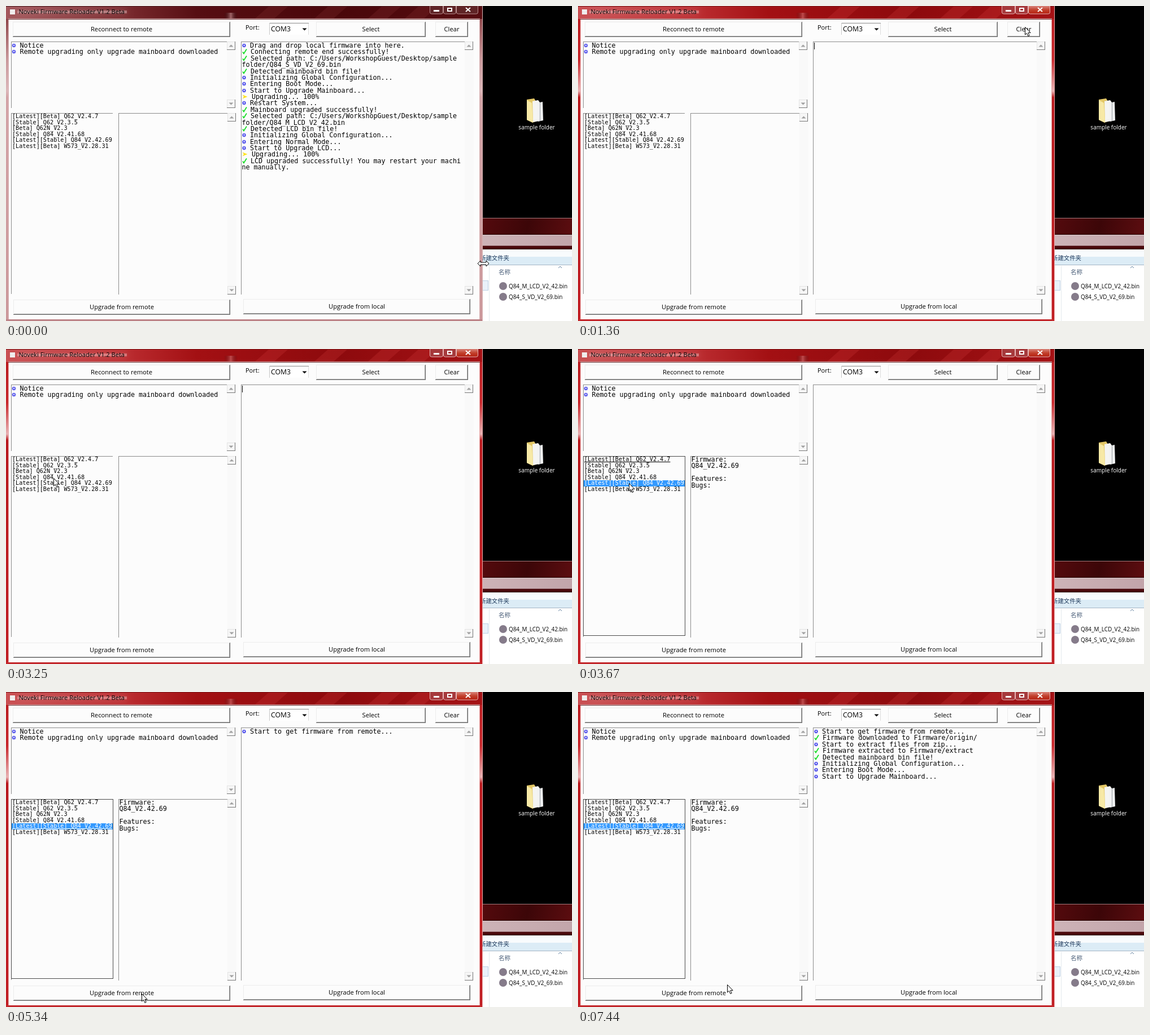
Animation, 1002 px wide and 559 px high, one loop 8000 ms. Source, as an HTML page with a canvas:

```html
<!DOCTYPE html>
<html lang="en">
<head>
<meta charset="utf-8">
<title>Firmware tool</title>
<style>
html, body { margin: 0; width: 100%; height: 100%; overflow: hidden; background: #000; }
canvas { display: block; width: 1002px; height: 559px; }
</style>
</head>
<body>
<canvas id="stage" width="1002" height="559"></canvas>
<script>
const ctx = document.getElementById('stage').getContext('2d');
const LOOP = 8000;
const FOCUS = 1360, PRESS = 1210, PICK = 3670, RELEASE = 3820, START = 5340;
const MONO = '11.66px "DejaVu Sans Mono", monospace';
const LIST = '10.13px "DejaVu Sans Mono", monospace';
const ui = size => `${size}px "Open Sans", "Noto Sans CJK SC", sans-serif`;
const ROW = 11.38, PAPER = '#fcfcfc';

const ITEMS = [
  '[Latest][Beta] Q62_V2.4.7', '[Stable] Q62_V2.3.5', '[Beta] Q62N_V2.3',
  '[Stable] Q84_V2.41.68', '[Latest][Stable] Q84_V2.42.69', '[Latest][Beta] W573_V2.28.31'
];
const PICKED = 4;

// First character of a log line: * gear, + tick, > arrow, _ none
const FULL_LOG = [
  '*Drag and drop local firmware into here.',
  '+Connecting remote end successfully!',
  '+Selected path: C:/Users/WorkshopGuest/Desktop/sample',
  '_folder/Q84_S_VD_V2_69.bin',
  '+Detected mainboard bin file!',
  '*Initializing Global Configuration...',
  '*Entering Boot Mode...',
  '*Start to Upgrade Mainboard...',
  '>Upgrading... 100%',
  '*Restart System...',
  '+Mainboard upgraded successfully!',
  '+Selected path: C:/Users/WorkshopGuest/Desktop/sample',
  '_folder/Q84_M_LCD_V2_42.bin',
  '+Detected LCD bin file!',
  '*Initializing Global Configuration...',
  '*Entering Normal Mode...',
  '*Start to Upgrade LCD...',
  '>Upgrading... 100%',
  '+LCD upgraded successfully! You may restart your machi',
  '_ne manually.'
];
const NEW_LOG = [
  '*Start to get firmware from remote...',
  '+Firmware downloaded to Firmware/origin/',
  '*Start to extract files from zip...',
  '+Firmware extracted to Firmware/extract',
  '+Detected mainboard bin file!',
  '*Initializing Global Configuration...',
  '*Entering Boot Mode...',
  '*Start to Upgrade Mainboard...'
];

// Pointer moves: start, end, steps, x, y
const MOVES = [
  [120, 240, 2, 792, 130], [510, 1210, 6, 791, 37],
  [1640, 2460, 7, 80, 207], [2580, 2581, 1, 75, 215],
  [2730, 3670, 7, 90, 238], [3820, 4780, 8, 240, 535],
  [5480, 5760, 3, 264, 519]
];

// Glass colours of the window without and with focus
const IDLE = {
  bar: ['#a4585c', '#7a2a2e', '#560e12', '#4a070a', '#560c10'],
  side: ['#7c2c30', '#c9999c', '#dcb8ba', '#d3a4a7', '#cb989b'],
  streak: 'rgba(150,60,62,.2)', shine: 'rgba(225,175,176,.55)',
  top: '#4c2022', line: '#d8b2b3', bottom: '#bd8488', button: '#5f2426', rim: '#b98c8d'
};
const ACTIVE = {
  bar: ['#c95053', '#bb2c30', '#a31013', '#8d0a0d', '#a51215'],
  side: ['#b5191d', '#c8282c', '#e8b4b5', '#b8191d', '#c11f24'],
  streak: 'rgba(225,70,70,.2)', shine: 'rgba(235,150,150,.45)',
  top: '#7a1517', line: '#e9aaaa', bottom: '#c3282c', button: '#a63a3c', rim: '#e7b5b5'
};

function rect(x, y, w, h, color) {
  ctx.fillStyle = color;
  ctx.fillRect(x, y, w, h);
}

function text(str, x, y, font, color = '#000', align = 'left') {
  ctx.font = font;
  ctx.fillStyle = color;
  ctx.textAlign = align;
  ctx.fillText(str, x, y);
}

function poly(points, fill, stroke, width = 1) {
  ctx.beginPath();
  points.forEach(([x, y], i) => i ? ctx.lineTo(x, y) : ctx.moveTo(x, y));
  if (fill) { ctx.closePath(); ctx.fillStyle = fill; ctx.fill(); }
  if (stroke) { ctx.strokeStyle = stroke; ctx.lineWidth = width; ctx.stroke(); }
}

function disc(x, y, r, color) {
  ctx.beginPath();
  ctx.arc(x, y, r, 0, 7);
  ctx.fillStyle = color;
  ctx.fill();
}

function gradient(x0, y0, x1, y1, colors, stops) {
  const g = ctx.createLinearGradient(x0, y0, x1, y1);
  colors.forEach((c, i) => g.addColorStop(stops ? stops[i] : i / (colors.length - 1), c));
  return g;
}

function folderIcon() {
  poly([[922, 166], [935, 164], [938, 169], [938, 205], [932, 207], [922, 202]], '#e3c766');
  poly([[932, 169], [942, 167], [945, 171], [945, 204], [933, 206]], '#f4f4f2');
  poly([[941, 172], [950, 170], [951, 203], [942, 205]], '#f0f1f2');
  poly([[945.5, 171], [945.5, 204]], null, '#9a9fa3');
  poly([[922, 167], [931, 172], [933, 207], [922, 202]], '#f7e9a6');
}

function desktop() {
  rect(0, 0, 1002, 559, '#000');
  folderIcon();
  text('sample folder', 939.5, 219, ui(10), '#fff', 'center');

  rect(844, 377, 158, 30, gradient(844, 377, 1002, 407, ['#540a0d', '#3c0608', '#5c0d10']));
  rect(844, 376, 158, 1, '#a77b7d');
  rect(844, 405, 158, 1, '#240405');
  rect(844, 406, 158, 1, '#e6d2d4');
  rect(844, 407, 158, 18, gradient(844, 0, 1002, 0, ['#cdb3b7', '#c2a5aa']));
  rect(844, 425, 158, 1, '#8a6065');
  rect(844, 426, 158, 5, '#4a080b');
  rect(844, 431, 158, 1, '#2a1515');

  rect(844, 432, 158, 127, '#fff');
  rect(844, 433, 158, 12, '#f8fbfd');
  rect(844, 445, 158, 14, '#dcecf6');
  rect(844, 459, 158, 1, '#a3b5c5');
  text('新建文件夹', 839, 450.5, ui(10.4), '#1e395b');
  rect(855, 461, 1, 98, '#e4e9ee');
  rect(844, 487, 10, 18, '#e9f1fa');
  ctx.strokeStyle = '#bdd0e4';
  ctx.lineWidth = 1;
  ctx.strokeRect(840.5, 487.5, 13, 17);
  text('名称', 872, 475.5, ui(10.6), '#4c607a');
  poly([[978, 465], [981, 462], [984, 465]], null, '#5f7f9d');
  ['Q84_M_LCD_V2_42.bin', 'Q84_S_VD_V2_69.bin'].forEach((name, i) => {
    disc(880, 497 + i * 19, 7, '#857b8a');
    text(name, 890, 501 + i * 19, ui(9.9));
  });
}

// Soft light glow behind the caption
function captionGlow() {
  ctx.save();
  ctx.beginPath();
  ctx.rect(0, 1, 844, 21);
  ctx.clip();
  ctx.shadowColor = 'rgba(255,240,240,.75)';
  ctx.shadowBlur = 12;
  rect(20, 8, 194, 5, 'rgba(255,235,235,.35)');
  ctx.restore();
}

function frame(glass) {
  rect(0, 0, 844, 559, gradient(0, 0, 0, 559, glass.side, [0, .17, .27, .29, 1]));
  rect(0, 0, 844, 23, gradient(0, 0, 844, 0, glass.bar, [0, .25, .4, .7, 1]));
  for (const x of [440, 545, 640, 705]) poly([[x, 23], [x + 26, 0], [x + 60, 0], [x + 34, 23]], glass.streak);
  rect(386, 12, 24, 11, gradient(386, 0, 410, 0, ['transparent', glass.shine, 'transparent']));
  captionGlow();
  rect(0, 0, 844, 1, glass.top);
  rect(4, 22, 835, 1, glass.line);
  rect(4, 23, 1, 534, glass.line);
  rect(838, 23, 1, 534, glass.line);
  rect(0, 556, 844, 3, glass.bottom);
  rect(843, 0, 1, 559, glass.line);
  rect(5, 23, 833, 533, PAPER);
  rect(4, 23, 835, 1, '#5b2022');

  rect(7, 6, 9, 9, '#f0eded');
  text('Noveki Firmware Reloader V1.2 Beta', 22.5, 14, ui(11.1));
  controls(glass);
}

function controls(glass) {
  [[750, 24], [774, 23], [797, 39]].forEach(([x, w], i) => {
    ctx.beginPath();
    ctx.roundRect(x + .5, -4, w - 1, 18, 3);
    ctx.fillStyle = glass === ACTIVE && i === 2
      ? gradient(0, 0, 0, 14, ['#d8857b', '#c2402c', '#b5200f'])
      : glass.button;
    ctx.fill();
    ctx.strokeStyle = glass.rim;
    ctx.lineWidth = 1;
    ctx.stroke();
  });
  rect(757, 7, 10, 3, '#fff');
  ctx.strokeStyle = '#fff';
  ctx.lineWidth = 2;
  ctx.strokeRect(782, 4, 7, 5);
  poly([[814, 3], [822, 10]], null, '#fff', 2);
  poly([[822, 3], [814, 10]], null, '#fff', 2);
}

function button(x, y, w, label, pressed) {
  const h = 27;
  rect(x, y, w, h, pressed ? '#f1f1f1' : PAPER);
  if (pressed) {
    rect(x, y, w, 2, '#747474');
    rect(x, y, 2, h, '#747474');
    rect(x + w - 1, y, 1, h, '#dedede');
    rect(x, y + h - 1, w, 1, '#dedede');
  } else {
    rect(x, y, w, 1, '#ececec');
    rect(x, y, 1, h, '#ececec');
    rect(x + 1, y + h - 2, w - 1, 1, '#a8a8a8');
    rect(x + w - 2, y + 1, 1, h - 1, '#a8a8a8');
    rect(x, y + h - 1, w, 1, '#666');
    rect(x + w - 1, y, 1, h, '#666');
  }
  const d = pressed ? 1 : 0;
  text(label, x + w / 2 + d, y + 17 + d, ui(11.2), '#000', 'center');
}

function arrowButton(x, y, dir) {
  rect(x, y, 15, 15, '#f6f6f6');
  rect(x, y, 15, 1, '#e4e4e4');
  rect(x, y, 1, 15, '#e4e4e4');
  rect(x, y + 14, 15, 1, '#777');
  rect(x + 14, y, 1, 15, '#777');
  const cx = x + 7.5, cy = y + 7.5;
  poly([[cx - 4, cy + 2 * dir], [cx + 4, cy + 2 * dir], [cx, cy - 2 * dir]], '#a0a0a0');
}

function pane(x, y, w, h, bar) {
  rect(x, y, w, h, PAPER);
  rect(x, y, w, 1, '#8c8c8c');
  rect(x, y, 1, h, '#8c8c8c');
  if (!bar) return;
  rect(x + w, y, 16, h, '#f9f9f9');
  arrowButton(x + w, y, 1);
  arrowButton(x + w, y + h - 15, -1);
}

function gear(x, y) {
  ctx.beginPath();
  ctx.arc(x, y, 2, 0, 7);
  ctx.strokeStyle = '#1414e6';
  ctx.lineWidth = 1.1;
  ctx.stroke();
  for (let i = 0; i < 8; i++) {
    const a = i * Math.PI / 4;
    disc(x + 3 * Math.cos(a), y + 3 * Math.sin(a), .6, '#1414e6');
  }
}

function log(lines, x) {
  lines.forEach((line, i) => {
    const y = Math.round(74 + i * ROW), mark = line[0];
    if (mark === '*') gear(x + 4, y - 4);
    if (mark === '+') poly([[x + 1.5, y - 3.5], [x + 3.5, y - .5], [x + 8.5, y - 8.5]], null, '#10dc20', 1.7);
    if (mark === '>') poly([[x + 1, y - 7.5], [x + 10, y - 4], [x + 1, y - .5], [x + 3.5, y - 4]], '#ffe21a');
    text(line.slice(1), x + { '*': 14.5, '+': 15.5, '>': 17.5, _: 0 }[mark], y, MONO);
  });
}

function list(t) {
  pane(9, 190, 180, 321);
  if (t >= PICK) {
    ctx.strokeStyle = '#4a4a4a';
    ctx.lineWidth = 1;
    ctx.strokeRect(9.5, 190.5, 180, 318);
    rect(10, 233, 179, 11, '#3399ff');
  }
  const current = t < PICK ? -1 : t < RELEASE ? 0 : PICKED;
  ITEMS.forEach((item, i) => {
    const y = Math.round(199.4 + i * 10.5);
    const color = t >= PICK && i === PICKED ? '#fff' : '#000';
    text(item, 11, y, LIST, color);
    if (i === current) rect(11, y + 1, ctx.measureText(item).width, 1, color);
  });
}

function app(t) {
  frame(t < FOCUS ? IDLE : ACTIVE);
  button(12, 28, 385, 'Reconnect to remote');
  text('Port:', 424, 42, ui(11));
  rect(466, 31, 70, 20, '#fff');
  rect(466, 30, 70, 1, '#8c8c8c');
  rect(466, 30, 1, 21, '#c8c8c8');
  rect(535, 31, 1, 20, '#dcdcdc');
  text('COM3', 469, 45, ui(12.2));
  poly([[524.5, 39.5], [532.5, 39.5], [528.5, 43.5]], '#000');
  button(549, 28, 194, 'Select');
  button(760, 28, 58, 'Clear', t >= PRESS && t < FOCUS);

  pane(9, 63, 382, 118, true);
  log(['*Notice', '*Remote upgrading only upgrade mainboard downloaded'], 10);
  list(t);
  pane(199, 190, 193, 322, true);
  if (t >= PICK) {
    ['Firmware:', 'Q84_V2.42.69', '', 'Features:', 'Bugs:'].forEach((line, i) =>
      text(line, 200.5, Math.round(200 + i * ROW), MONO));
  }
  pane(416, 63, 396, 449, true);
  if (t < FOCUS) log(FULL_LOG, 417.5);
  else log(NEW_LOG.slice(0, t < START ? 0 : t < 6880 ? 1 : t < 7440 ? 7 : 8), 417.5);
  if (t >= PRESS && t < PICK) rect(418, t < FOCUS ? 293 : 65, 1, 12, '#000');

  button(13, 521, 384, 'Upgrade from remote');
  button(420, 520, 402, 'Upgrade from local');
}

function pointer(t) {
  if (t < 120) {
    const half = [[835, 457], [840, 452], [840, 455], [850, 455], [850, 452], [855, 457]];
    const rest = [[850, 462], [850, 459], [840, 459], [840, 462], [835, 457]];
    poly([...half, ...rest], '#fff', '#000');
    return;
  }
  if (t >= 5760 && t < 6450) return;
  let x = 845, y = 457;
  for (const [t0, t1, n, tx, ty] of MOVES) {
    if (t < t0) break;
    const tick = (t1 - t0) / Math.max(1, n - 1);
    const u = Math.min(1, (Math.floor((t - t0) / tick + 1e-6) + 1) / n);
    const e = u * u * (3 - 2 * u);
    x += (tx - x) * e;
    y += (ty - y) * e;
  }
  ctx.save();
  ctx.translate(Math.round(x) + .5, Math.round(y) + .5);
  poly([[0, 0], [0, 13.5], [3, 10.8], [5.3, 16], [7.6, 15], [5.4, 10], [9.6, 10]], '#fff');
  ctx.strokeStyle = '#000';
  ctx.lineWidth = 1;
  ctx.stroke();
  ctx.restore();
}

function draw(now) {
  const t = now % LOOP;
  desktop();
  app(t);
  pointer(t);
}

const begin = performance.now();
function tick() {
  draw(performance.now() - begin);
  requestAnimationFrame(tick);
}
tick();
</script>
</body>
</html>
```
